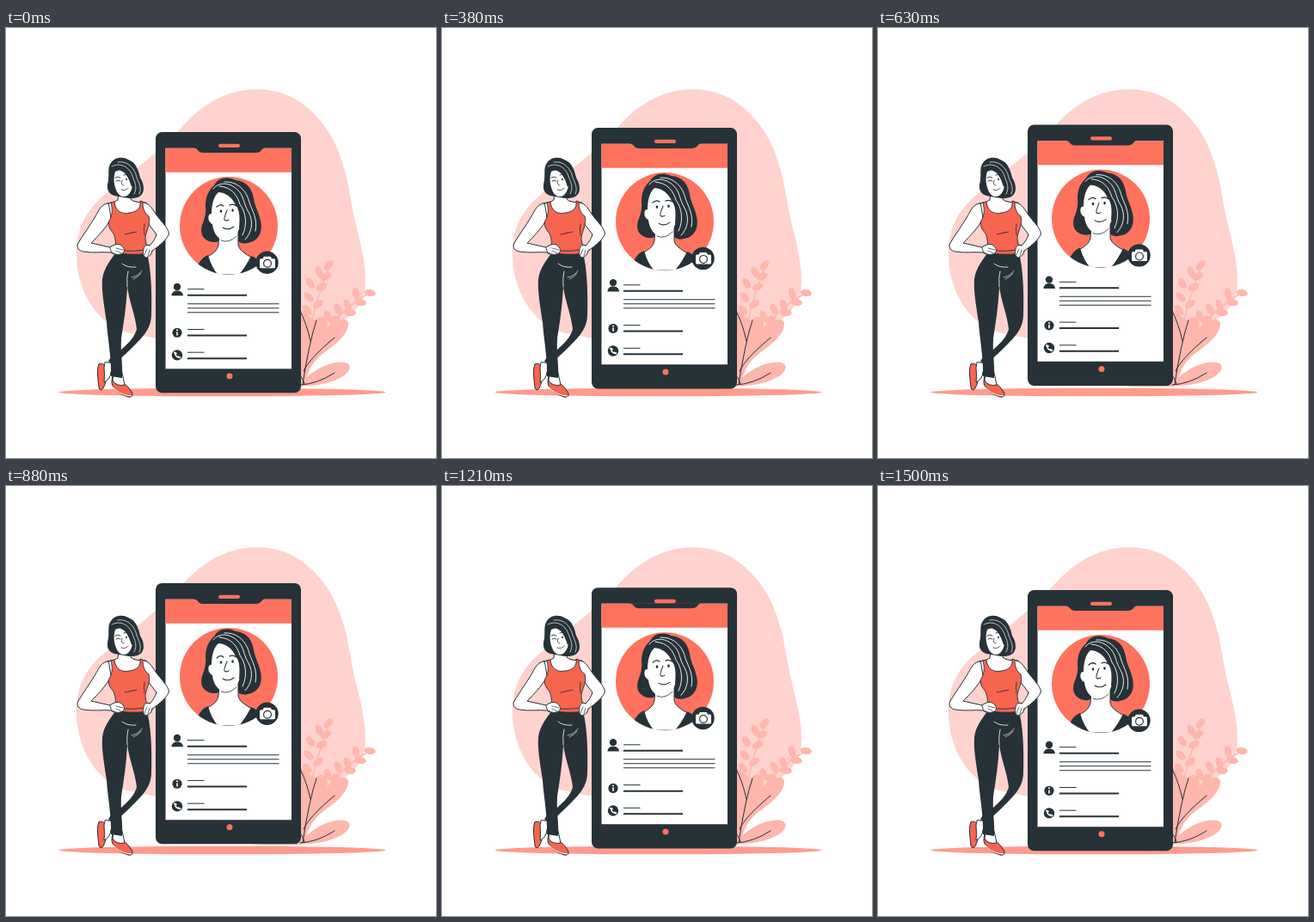
Animation, 500 px wide and 500 px high, one loop 1.54 s. Source, as an HTML page with a canvas:

```html
<!DOCTYPE html>
<html lang="en">
<head>
<meta charset="utf-8">
<title>Profile screen</title>
<style>
html, body { margin: 0; width: 100%; height: 100%; overflow: hidden; background: #fff; }
canvas { display: block; width: 500px; height: 500px; }
</style>
</head>
<body>
<canvas id="stage"></canvas>
<script>
const LOOP = 1540;
const PEAK = 738;
const DARK = '#263238', CORAL = '#ff725e', WHITE = '#fff';
const BLOB = '#ffd2ce', LEAF = '#ffb6ac', GROUND = '#ff9b8c';
const TOP = '#f7654f';

const canvas = document.getElementById('stage');
const ctx = canvas.getContext('2d');
const ratio = window.devicePixelRatio || 1;
canvas.width = canvas.height = 500 * ratio;

function shape(d, fill, stroke, width = 1) {
  const path = new Path2D(d);
  if (fill) { ctx.fillStyle = fill; ctx.fill(path); }
  if (stroke) {
    ctx.strokeStyle = stroke;
    ctx.lineWidth = width;
    ctx.stroke(path);
  }
}

const line = (d, color = DARK, width = 1) => shape(d, null, color, width);

function ellipse(x, y, rx, ry, fill, angle = 0) {
  ctx.beginPath();
  ctx.ellipse(x, y, rx, ry, angle, 0, Math.PI * 2);
  ctx.fillStyle = fill;
  ctx.fill();
}

const dot = (x, y, r, fill) => ellipse(x, y, r, r, fill);

function box(x, y, w, h, r, fill) {
  ctx.beginPath();
  ctx.roundRect(x, y, w, h, r);
  ctx.fillStyle = fill;
  ctx.fill();
}

function sprig(stem, leaves) {
  line(stem, LEAF, 1.5);
  for (const [x, y, angle] of leaves) ellipse(x, y, 6.8, 4, LEAF, angle * Math.PI / 180);
}

function backdrop() {
  shape('M292 71.3 C254 71.3 224 92 202 118 C175 148 138 172 111 197 C89 217 81 239 82 266 ' +
    'C83 305 105 346 145 355 C210 370 315 375 370 353 C402 338 418 322 418 294 ' +
    'C418 262 406 232 401 200 C393 150 380 117 349 91.5 C334 79 315 71.3 292 71.3Z', BLOB);
  ellipse(251.5, 423.5, 190, 4.8, GROUND);
}

function plants() {
  sprig('M346 400 Q354 330 376 277', [
    [375, 276, -50], [364, 284, 65], [372, 289, -25], [354, 297, 55],
    [367, 301, -25], [352, 313, 45], [363, 321, -35], [350, 328, 50]]);
  sprig('M350 390 Q378 332 423 308', [
    [423, 308, 10], [407, 309, 75], [412, 319, 10], [397, 322, 65],
    [400, 331, 5], [386, 327, 65], [382, 339, -25], [374, 335, 70]]);
  shape('M340 326 C351 331 357 342 360 339 C370 330 376 342 373 351 ' +
    'C383 340 396 335 398 343 C399 356 382 369 368 379 C357 387 350 400 347 416 L336 416Z', LEAF);
  shape('M284 417 C318 414 340 415 351 405 C365 393 383 387 394 389 ' +
    'C403 391 401 400 390 406 C376 414 358 416 341 417Z', LEAF);
  line('M342 329 Q350 345 354 364 M361 340 Q353 363 345 414 M382 360 Q352 385 346 399 ' +
    'M382 401 Q362 414 342 415 M338 401 Q345 405 347 414');
}

function profilePortrait() {
  ctx.save();
  ctx.beginPath();
  ctx.arc(259, 230, 57, 0, Math.PI * 2);
  ctx.fillStyle = CORAL;
  ctx.fill();
  ctx.clip();

  // hair behind the face
  shape('M242 183 C246 174 258 172 267 177 C280 178 286 187 288 198 C289 207 294 214 296 224 ' +
    'C299 237 294 248 281 250 Q274 252 269 247 L249 246 C247 250 239 250 234 247 ' +
    'C227 243 226 236 228 229 C231 221 233 216 232 207 C232 197 235 189 242 183Z', DARK);
  shape('M248 239 L247 252 C246 259 240 263 234 266 L217 287 L302 287 L290 270 ' +
    'C282 264 271 260 270 252 L270 236Z', WHITE, DARK);
  shape('M235 264 Q223 268 219 290 L250 290 Q240 282 235 264Z', DARK);
  shape('M285 265 Q278 279 269 289 L303 289 Q296 268 285 265Z', DARK);

  shape('M247 191 C241 196 239 207 239 216 C234 215 234 226 240 228 ' +
    'C241 239 248 248 257 247.5 C266 247 271 237 273 226 C275 214 272 199 264 193 ' +
    'C258 190 252 192 247 191Z', WHITE);
  shape('M244 190 C256 191 263 197 267 206 C272 212 272 220 271 233 L281 220 L269 189 L250 184Z', DARK);
  line('M241 187 C248 178 261 180 269 188 C277 195 276 205 282 214 C288 225 286 238 278 246 ' +
    'M248 184 C263 185 269 195 272 205 C279 214 281 229 275 241 ' +
    'M254 179 C270 178 280 190 283 203 C286 212 293 222 290 236', WHITE, 0.9);

  ellipse(250, 213, 1.3, 1.8, DARK);
  ellipse(263.5, 212, 1.3, 1.8, DARK);
  line('M245 208 Q249 204 253 207 M260 206 Q264 204 268 207', DARK, 1.3);
  line('M257 212 Q253 222 254 223 Q256 225 259 223 M252 232 Q258 236 265 231', DARK, 1.1);
  line('M250 247 Q259 251 268 242', DARK, 0.8);
  ctx.restore();
}

function cameraBadge() {
  dot(303.5, 272.8, 13.2, DARK);
  box(295, 268.3, 18, 11, 1.5, WHITE);
  box(299, 265.8, 9.5, 5, 1.5, WHITE);
  dot(304, 273.8, 5, DARK);
  dot(304, 273.8, 3.8, WHITE);
}

const rule = (y, w, h) => box(211, y - h / 2, w, h, 0, DARK);

function row(y) {
  rule(y, 19.5, 1);
  rule(y + 7, 69, 2);
}

function details() {
  dot(199, 301, 4.2, DARK);
  shape('M192.3 311.3 Q193 305.5 199 305.5 Q205.5 305.5 206 311.3Z', DARK);
  row(303.7);
  for (const y of [320.7, 325.7, 330.7]) rule(y, 106.5, 1);

  dot(199, 354.3, 5.6, DARK);
  dot(199, 351.3, 1, WHITE);
  line('M199 354V357', WHITE, 1.6);
  row(350.5);

  dot(199, 380.4, 6.2, DARK);
  line('M196.5 377.4 Q196.5 382.2 201.5 383.5', WHITE, 1.5);
  line('M196 377.7L197.8 378.4 M200.3 382.4L202.3 383.2', WHITE, 2);
  row(377.2);
}

function phone() {
  box(174, 121, 169, 303.3, 7.5, DARK);
  box(185.5, 139.7, 146.5, 256.5, 0, WHITE);
  box(185.5, 139.7, 146.5, 28, 0, CORAL);
  shape('M218 139 Q222 140 223 142 Q225 145 229 145 L290 145 Q295 145 297 142 Q298 140 301 139Z', DARK);
  box(247, 134.7, 25, 4.3, 2.1, CORAL);
  dot(260, 404.8, 3.5, CORAL);
  profilePortrait();
  cameraBadge();
  details();
}

function womanLegs() {
  // ankles and shoes
  shape('M108 391 C111 389 115 390 116 397 Q118 410 113 419 Q109 423 108 418 ' +
    'C107 408 105 397 108 391Z', TOP, DARK);
  shape('M115 389 L114 395 Q115 405 114 412 Q121 409 122 400 L125 390Z', WHITE, DARK);
  shape('M124 405 Q122 412 124 416 Q129 425 142 429 Q148 430 147 425 Q144 418 136 412Z', TOP, DARK);
  shape('M125 401 L124 410 Q128 417 138 415 L135 401Z', WHITE, DARK);
  line('M124 417 Q131 427 146 428', WHITE, 1);

  // far leg first, then the near one
  shape('M138 269 L164 262 C168 277 170 302 169 333 C169 345 164 353 157 361 ' +
    'C147 372 136 382 126 391 L119 388 C122 381 128 377 134 374 C142 367 150 359 152 350 ' +
    'C150 332 143 318 141 300Z', DARK);
  shape('M127 262 L163 262 C163 275 156 286 143 295 L141 302 C140 322 137 342 134 361 ' +
    'C133 380 136 392 135 407 L122 405 C123 385 118 360 117 342 C114 322 111 306 112 292 ' +
    'C114 278 122 270 127 262Z', DARK);
  line('M135 274 Q141 279 151 278 M142 283 Q140 291 141 301', WHITE, 0.8);
  line('M146 290 Q155 288 158 282 M148 292 Q155 289 157 285', WHITE, 0.6);
}

function womanBody() {
  shape('M131 191 L130 200 Q125 204 117 204 L120 222 L160 222 L163 203 Q148 203 145 199 L145 190Z',
    WHITE, DARK);
  // arms
  shape('M119 204 C111 204 108 212 104 219 C97 231 89 241 83.5 251 C82 256 85 259 90 260 ' +
    'C101 262 113 260 122 261 C127 265 134 264 137 260 L135 254 C130 251 125 252 121 255 ' +
    'L99 250 C107 242 116 233 122 222Z', WHITE, DARK);
  shape('M157 203 C166 202 169 209 174 216 C180 225 188 231 189.5 239 C188 245 179 253 170 259 ' +
    'C169 266 163 267 160 263 L159 255 Q162 250 167 253 C171 249 174 244 175 240 ' +
    'C169 232 162 224 160 217Z', WHITE, DARK);
  // tank top
  shape('M122 203 L126 202 C127 213 135 217 143 215 C153 214 157 209 156 201 L159 202 ' +
    'C159 210 161 215 166 219 C169 228 162 237 162 245 L165 262 Q146 265 126 261 ' +
    'C128 253 128 246 125 239 C121 234 118 230 120 224 C124 218 124 211 122 203Z', TOP, DARK, 0.9);
  line('M138 240 L152 237 M161 228 Q160 234 161 241 M137 259 Q150 260 161 258', DARK, 0.9);
  // hands on the hips
  shape('M121 255 Q127 250 133 252 Q139 256 137 261 Q131 266 123 261Z', WHITE, DARK, 0.9);
  line('M128 256 L136 258 M128 259 L134 262', DARK, 0.7);
  shape('M167 253 Q161 251 160 257 Q158 265 163 267 Q169 265 170 259', WHITE, DARK, 0.9);
  line('M164 257 L161 264 M167 258 L165 265', DARK, 0.7);
}

function womanHead() {
  shape('M122 157 C126 150 136 149 142 153 C151 156 154 165 156 174 C161 182 162 192 155 196 ' +
    'C149 199 142 198 137 197 L126 195 C117 192 117 185 119 177 C120 169 118 162 122 157Z', DARK);
  shape('M127 167 C125 173 125 181 128 188 C131 197 139 198 143 193 C148 187 148 179 145 172 ' +
    'C141 167 135 163 127 167Z', WHITE);
  shape('M126 166 C136 163 142 171 146 185 L151 178 L142 161 L130 158Z', DARK);
  line('M123 161 C133 156 143 161 147 172 C150 180 153 185 149 193 ' +
    'M130 156 C142 154 150 164 152 174 C155 181 158 187 155 193', WHITE, 0.7);
  ellipse(140, 176, 0.9, 1.3, DARK);
  line('M128 178 Q131 176 133 178 M127 174 Q130 172 133 174 M137 171 Q140 169 143 171', DARK, 0.9);
  line('M135 177 Q133 183 137 183 M134 188 Q139 190 142 186', DARK, 0.8);
}

function render(now) {
  const lift = 4.4 * (1 + Math.cos((now - PEAK) / LOOP * Math.PI * 2));

  ctx.setTransform(ratio, 0, 0, ratio, 0, 0);
  ctx.lineCap = ctx.lineJoin = 'round';
  ctx.fillStyle = WHITE;
  ctx.fillRect(0, 0, 500, 500);

  backdrop();
  plants();
  ctx.save();
  ctx.translate(0, -lift);
  phone();
  ctx.restore();
  womanLegs();
  womanBody();
  womanHead();
}

const start = performance.now();
function tick() {
  render((performance.now() - start) % LOOP);
  requestAnimationFrame(tick);
}
tick();
</script>
</body>
</html>
```
